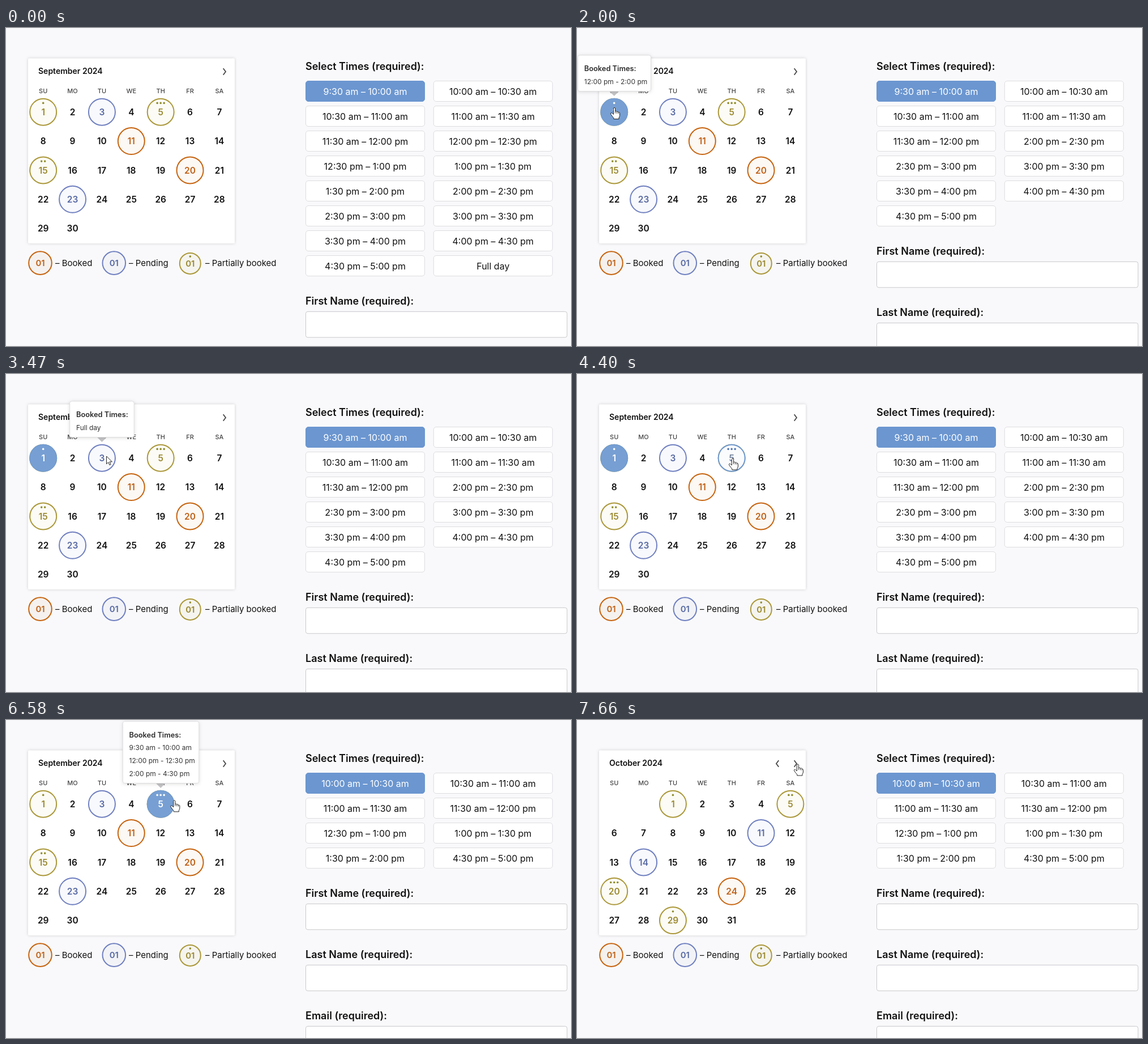
Animation, 998 px wide and 561 px high, one loop 8000 ms. Source, as an HTML page:

```html
<!DOCTYPE html>
<html lang="en">
<head>
<meta charset="utf-8">
<title>Booking calendar</title>
<style>
html, body { margin: 0; width: 100%; height: 100%; overflow: hidden; background: #f9f9fb; }
svg { display: block; width: 998px; height: 561px; font-family: Inter, "Liberation Sans", sans-serif; }
</style>
</head>
<body>
<svg id="stage" viewBox="0 0 998 561"></svg>
<script>
const NS = "http://www.w3.org/2000/svg";
const LOOP = 8000;
const stage = document.getElementById("stage");

function el(parent, name, attrs = {}, text) {
  const node = document.createElementNS(NS, name);
  for (const key in attrs) node.setAttribute(key, attrs[key]);
  if (text !== undefined) node.textContent = text;
  parent.appendChild(node);
  return node;
}
const group = (parent = stage) => el(parent, "g");
const show = (node, on) => node.setAttribute("visibility", on ? "inherit" : "hidden");

// Text whose capitals are centred on y
function label(parent, x, y, text, size, weight = 400, fill = "#111", anchor = "start") {
  return el(parent, "text", {
    x, y: y + size * 0.364, fill, "font-size": size, "font-weight": weight, "text-anchor": anchor
  }, text);
}
function box(parent, x, y, w, h, r, fill, stroke, extra = {}) {
  return el(parent, "rect", { x, y, width: w, height: h, rx: r, fill, stroke, ...extra });
}

const BLUE = "#6b96d0";
const LOOKS = {
  booked: { ring: "#c7640f", text: "#bf6015", fill: "#fcf8f4" },
  pending: { ring: "#7080c0", text: "#5769a3", fill: "#f8f9fd" },
  partial: { ring: "#ab983a", text: "#9a8930", fill: "#fcfbf5", dot: "#8f8c2c" },
  hover: { ring: "#6f99d0", text: "#70809a", fill: "#fafbfd", dot: "#5578b4" },
  chosen: { ring: "#739dd3", text: "#fff", fill: "#779fd3", dot: "#fff" }
};

function ring(parent, x, y, r, look, text, dots, size, dotUp, fill = look.fill) {
  const g = group(parent);
  el(g, "circle", { cx: x, cy: y, r: r - 1, fill, stroke: look.ring, "stroke-width": 2 });
  for (let i = 0; i < dots; i++) {
    el(g, "circle", { cx: x + (i - (dots - 1) / 2) * 6, cy: y - dotUp, r: 1.8, fill: look.dot });
  }
  label(g, x, y, text, size, 600, look.text, "middle");
  return g;
}

// Calendar
const colX = c => 65.7 + c * 51.87;
const rowY = r => 148.2 + r * 51.35;

function month(title, first, days, marks) {
  const g = group();
  label(g, 57, 75.7, title, 14, 600);
  for (let d = 1; d <= days; d++) {
    const n = d - 1 + first, x = colX(n % 7), y = rowY(Math.floor(n / 7));
    const [kind, dots] = marks[d] || [];
    if (kind) ring(g, x, y, 24.5, LOOKS[kind], d, dots || 0, 15.5, 15.8);
    else label(g, x, y, d, 15.5, 600, "#111", "middle");
  }
  return g;
}
function chevron(parent, x, dir) {
  el(parent, "path", {
    d: `M${x - 2.3 * dir} 71.2L${x + 2 * dir} 77L${x - 2.3 * dir} 82.8`,
    fill: "none", stroke: "#4b4b4b", "stroke-width": 1.9
  });
}

box(stage, 39, 53.5, 365, 326.5, 2, "#fff", "none", { style: "filter:drop-shadow(0 0 2.5px rgba(0,0,0,.17))" });
["SU", "MO", "TU", "WE", "TH", "FR", "SA"].forEach((d, i) =>
  label(stage, colX(i), 110.7, d, 11, 500, "#444", "middle"));
chevron(stage, 386, 1);

const september = month("September 2024", 0, 30, {
  1: ["partial", 1], 3: ["pending"], 5: ["partial", 3], 11: ["booked"],
  15: ["partial", 2], 20: ["booked"], 23: ["pending"]
});
const october = month("October 2024", 2, 31, {
  1: ["partial", 1], 5: ["partial", 2], 11: ["pending"], 14: ["pending"],
  20: ["partial", 3], 24: ["booked"], 29: ["partial", 1]
});
chevron(october, 354, -1);

const state = (day, dots, kind) => ring(september, colX(day - 1), rowY(0), 24.5, LOOKS[kind], day, dots, 15.5, 15.8);
const hover1 = state(1, 1, "hover"), chosen1 = state(1, 1, "chosen");
const hover5 = state(5, 3, "hover"), chosen5 = state(5, 3, "chosen");

// Legend
ring(stage, 60.5, 414.6, 21.3, LOOKS.booked, "01", 0, 15, 0, "#f5f1ee");
label(stage, 87, 414.6, "– Booked", 15);
ring(stage, 190.8, 414.6, 21.3, LOOKS.pending, "01", 0, 15, 0, "#f2f3f7");
label(stage, 217, 414.6, "– Pending", 15);
ring(stage, 325.3, 415.4, 19.5, LOOKS.partial, "01", 1, 15, 12.3, "#f5f4ee");
label(stage, 352, 414.6, "– Partially booked", 15);

// Form
const clock = m => `${(Math.floor(m / 60) + 11) % 12 + 1}:${m % 60 ? 30 : "00"} ${m < 720 ? "am" : "pm"}`;
const slots = [];
for (let m = 570; m < 1020; m += 30) slots.push(`${clock(m)} – ${clock(m + 30)}`);

function form(times) {
  const g = group();
  times.forEach((text, i) => {
    const x = 529.5 + (i % 2) * 225.8, y = 93.5 + (i >> 1) * 44;
    box(g, x, y, 210, 36, 4.5, i ? "#fff" : BLUE, i ? "#dddde1" : BLUE);
    label(g, x + 105, y + 18.2, text, 16, 400, i ? "#111" : "#fff", "middle");
  });
  let y = 129.5 + Math.ceil(times.length / 2) * 44;
  for (const name of ["First Name", "Last Name", "Email"]) {
    label(g, 529, y, name + " (required):", 18, 600);
    box(g, 529.5, y + 18.8, 461.5, 45.5, 3.5, "#fff", "#c9c9cc");
    y += 108;
  }
  return g;
}
label(stage, 529, 67.4, "Select Times (required):", 18, 600);
const free = taken => slots.filter((s, i) => !taken.includes(i));
const forms = [
  form([...slots, "Full day"]),
  form(free([5, 6, 7, 8])),
  form(free([0, 5, 9, 10, 11, 12, 13]))
];

// Tooltips
function tooltip(day, x, w, lines) {
  const g = group(), cx = colX(day - 1), top = 71.5 - (lines.length - 1) * 22.8;
  el(g, "path", { d: `M${cx - 8.5} 111.5h17l-8.5 8.5z`, fill: "#c4c4c6" });
  box(g, x, top - 23.5, w, 135 - top, 3.5, "#fff", "#dedee0",
    { style: "filter:drop-shadow(0 1px 3px rgba(0,0,0,.13))" });
  label(g, x + 11.3, top, "Booked Times:", 12.8, 600, "#2c2c2c");
  lines.forEach((s, i) => label(g, x + 11.3, top + 23 + i * 22.8, s, 12, 400, "#333"));
  return g;
}
const tips = [
  [tooltip(1, 1.5, 129, ["12:00 pm - 2:00 pm"]),
    [[1050, 0], [1410, 1], [2570, 1], [2840, 0]]],
  [tooltip(3, 112.7, 113.5, ["Full day"]),
    [[3080, 0], [3470, 1], [3900, 1], [4200, 0]]],
  [tooltip(5, 206.3, 134.5, ["9:30 am - 10:00 am", "12:00 pm - 12:30 pm", "2:00 pm - 4:30 pm"]),
    [[4600, 0], [5000, 1], [5780, 1], [5790, 0.82], [5860, 0.88], [5930, 1], [6590, 1], [6860, 0]]]
];

// Pointer
const glow = el(stage, "circle", { r: 13, fill: "#ffee2e", opacity: 0.85, style: "mix-blend-mode:multiply" });
const pointer = group();
const line = { fill: "#fff", stroke: "#222", "stroke-width": 1, "stroke-linejoin": "round" };
const arrow = el(pointer, "path", { d: "M.5.5V14.2L3.8 11.2L5.9 16L8.1 15L6 10.4H10.4Z", ...line });
const hand = group(pointer);
el(hand, "path", {
  d: "M-1.6 12V1.6Q-1.4 0 0 0T1.6 1.6V7Q2.2 5.9 3.3 6.2T4.5 7.6Q5.3 6.6 6.3 7T7.3 8.6" +
    "Q8.2 8 9 8.6T9.5 10.2V14Q9.2 16.2 8 17.6V20H-1.2V18.2Q-3.6 15.6-6 12Q-7.2 10.2-6 9.4Q-4.7 8.9-3.5 10.1Z", ...line
});
el(hand, "path", { d: "M1.6 7V10M4.5 7.6V10.4M7.3 8.6V10.8", fill: "none", stroke: "#222", "stroke-width": 0.9 });

const pathX = [[500, 132], [640, 118], [840, 86], [1000, 69], [1100, 66], [2560, 66], [2680, 110], [2800, 162],
  [2880, 177], [3900, 177], [4000, 190], [4150, 232], [4300, 266], [4400, 275], [6540, 275], [6580, 297],
  [6700, 341], [6840, 384], [6960, 401], [7060, 399], [7190, 390]];
const pathY = [[500, 152], [840, 146], [1100, 140.5], [2560, 140.5], [2880, 144.5], [3900, 144.5], [4400, 149],
  [6540, 149], [6580, 142], [6700, 122], [6840, 95], [6960, 80], [7060, 75], [7190, 78]];

function at(keys, t) {
  if (t <= keys[0][0]) return keys[0][1];
  for (let i = 1; i < keys.length; i++) {
    const [t0, a] = keys[i - 1], [t1, b] = keys[i];
    if (t < t1) return a + (b - a) * (t - t0) / (t1 - t0);
  }
  return keys[keys.length - 1][1];
}
const within = (t, a, b) => t >= a && t < b;

function draw(t) {
  const x = at(pathX, t), y = at(pathY, t);
  const late = t >= 7600;
  show(september, !late);
  show(october, late);
  show(hover1, within(t, 830, 2000));
  show(chosen1, within(t, 2000, 5860));
  show(hover5, within(t, 4230, 5860));
  show(chosen5, t >= 5860);
  const step = t < 2000 ? 0 : t < 5860 ? 1 : 2;
  forms.forEach((f, i) => show(f, i === step));
  for (const [node, keys] of tips) node.setAttribute("opacity", at(keys, t));

  show(glow, within(t, 5790, 5860) || within(t, 7460, 7600));
  glow.setAttribute("cx", x);
  glow.setAttribute("cy", y + 0.5);

  const overDay = y > 123 && Math.abs((x - colX(0) + 25.9) % 51.87 - 25.9) < 24.5 && !within(x, 145, 194);
  const overNext = y < 90 && Math.abs(x - 386) < 9;
  show(pointer, t >= 500);
  show(hand, t >= 500 && (overDay || overNext));
  show(arrow, t >= 500 && !(overDay || overNext));
  pointer.setAttribute("transform", `translate(${x} ${y})`);
}

const start = performance.now();
function tick(now) {
  draw(Math.max(0, now - start) % LOOP);
  requestAnimationFrame(tick);
}
draw(0);
requestAnimationFrame(tick);
</script>
</body>
</html>
```
